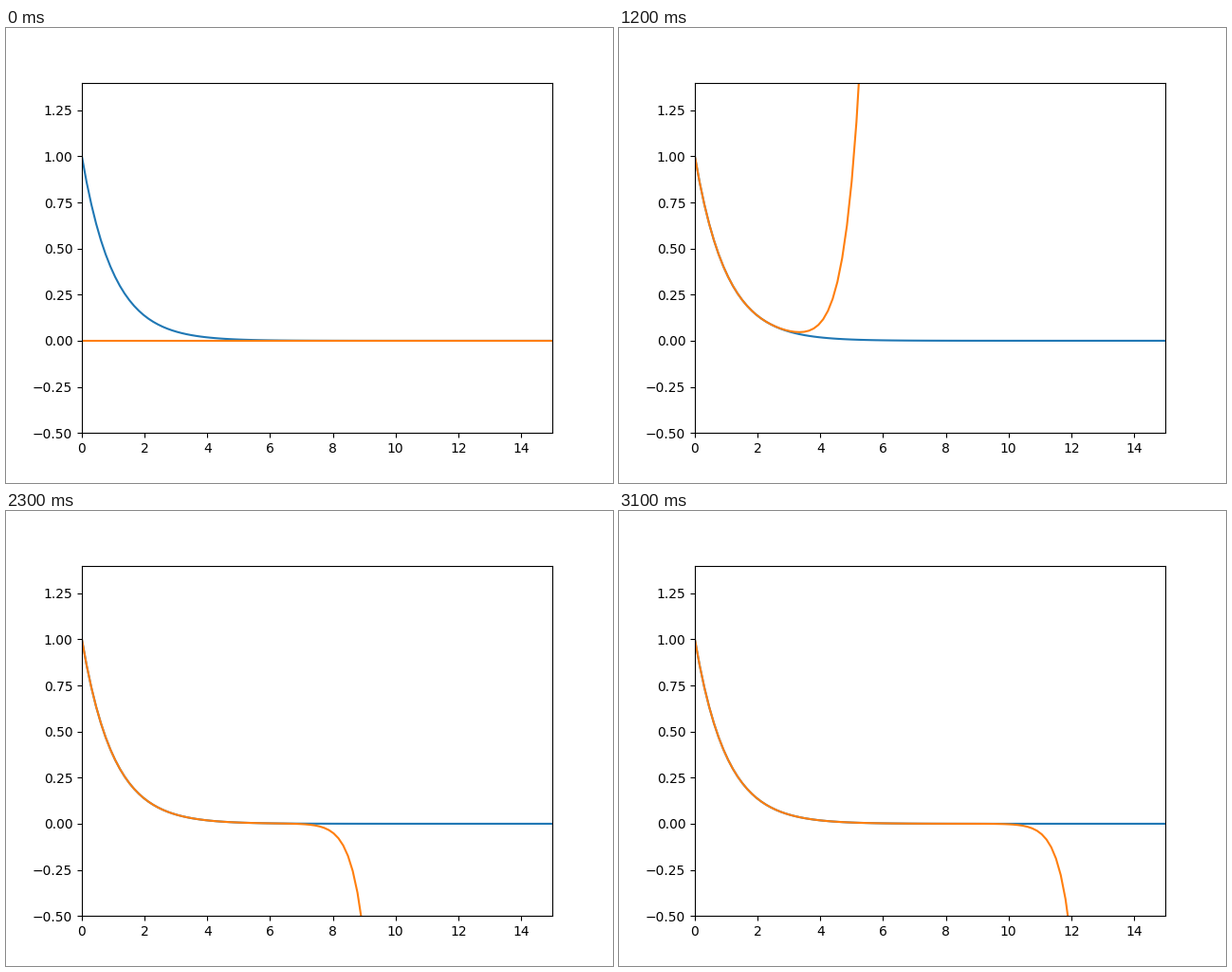
These frames come from a looping animation (640x480 px, 3.2 s). A matplotlib script:

```python
import math

import numpy as np
import matplotlib.pyplot as plt
from matplotlib.animation import FuncAnimation

FRAMES = 32
INTERVAL = 100

x = np.linspace(0, 15, 100)


def partial_sum(terms):
    """Sum of the first terms of the power series of exp(-x)."""
    total = np.zeros_like(x)
    for n in range(terms):
        total += (-x) ** n / math.factorial(n)
    return total


fig, ax = plt.subplots(figsize=(6.4, 4.8), dpi=100)
ax.set_xlim(0, 15)
ax.set_ylim(-0.5, 1.4)
ax.plot(x, np.exp(-x))
series, = ax.plot(x, partial_sum(0))


def update(i):
    # The empty sum is held for two steps, then one term joins per step.
    series.set_ydata(partial_sum(max(i - 1, 0)))
    return series,


anim = FuncAnimation(fig, update, frames=FRAMES, interval=INTERVAL,
                     repeat=True, repeat_delay=0)
plt.show()
```
